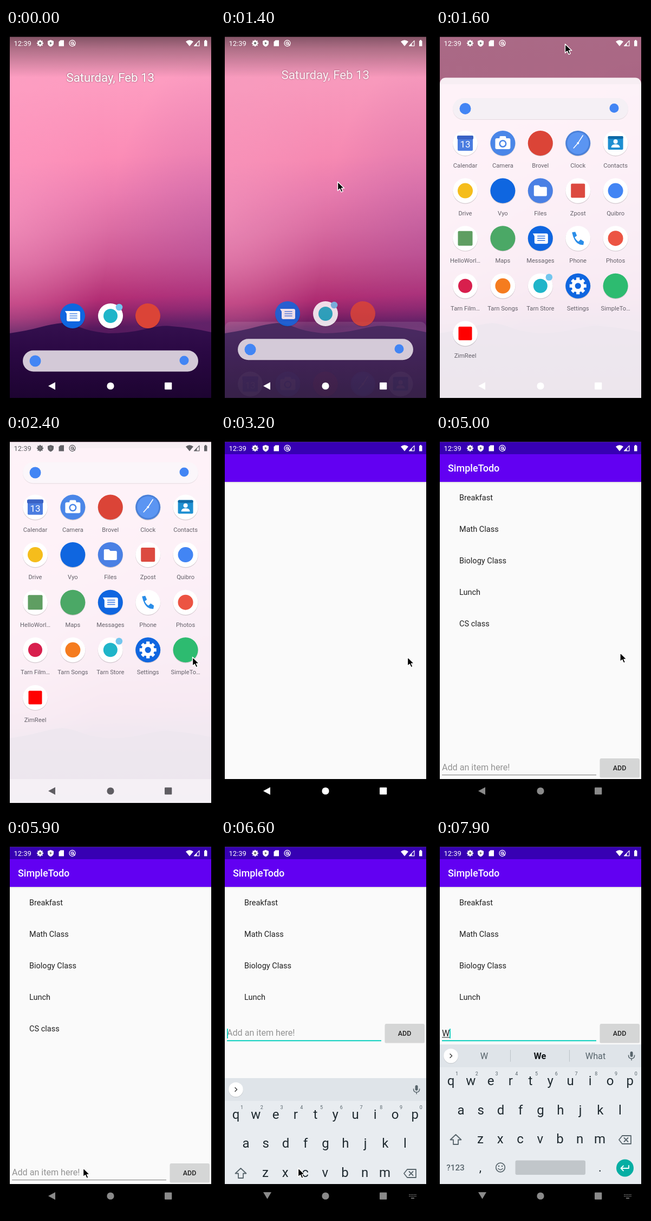
Recreate the animation shown at these times as an HTML page. Size 386x694 px, loop 8000 ms.

```html
<!DOCTYPE html>
<html lang="en">
<head>
<meta charset="utf-8">
<title>Todo app on a phone</title>
<style>
html, body { margin: 0; width: 100%; height: 100%; overflow: hidden; background: #000; }
svg { display: block; width: 100%; height: 100%; font-family: Roboto, sans-serif; }
.mid { text-anchor: middle; }
</style>
</head>
<body>
<svg id="stage" viewBox="0 0 386 694"></svg>
<script>
const LOOP = 8000;
const stage = document.getElementById('stage');

// Markup helpers
const rect = (x, y, w, h, fill, more = '') => `<rect x="${x}" y="${y}" width="${w}" height="${h}" fill="${fill}" ${more}/>`;
const disc = (x, y, r, fill, more = '') => `<circle cx="${x}" cy="${y}" r="${r}" fill="${fill}" ${more}/>`;
const path = (d, fill, more = '') => `<path d="${d}" fill="${fill}" ${more}/>`;
const line = (d, color, w = 1.5, more = '') => path(d, 'none', `stroke="${color}" stroke-width="${w}" stroke-linecap="round" stroke-linejoin="round" ${more}`);
const text = (x, y, size, fill, str, more = '') => `<text x="${x}" y="${y}" font-size="${size}" fill="${fill}" ${more}>${str}</text>`;
const mid = (x, y, size, fill, str, more = '') => text(x, y, size, fill, str, 'class="mid" ' + more);
const group = (id, body) => `<g id="${id}">${body}</g>`;
const move = (x, y, body) => `<g transform="translate(${x} ${y})">${body}</g>`;
const stops = list => list.map(([o, c, a = 1]) => `<stop offset="${o}" stop-color="${c}" stop-opacity="${a}"/>`).join('');
const screenRect = (fill, more) => rect(7, 16, 372, 665, fill, more);

function gear(r, fill, hole) {
  let teeth = '';
  for (let i = 0; i < 8; i++) {
    teeth += rect(-r * .2, -r, r * .4, r * .5, fill, `transform="rotate(${i * 45})"`);
  }
  return teeth + disc(0, 0, r * .76, fill) + disc(0, 0, r * .36, hole);
}

// App icons, each centred on 0,0
const BLUE = '#0f66e0';
const face = fill => disc(0, 1, 23.2, '#000', 'opacity=".16"') + disc(0, 0, 23, fill);
const badge = (color, r = 12) => face('#fff') + disc(0, 0, r, color);
const tile = (color, s = 24) => face('#fff') + rect(-s / 2, -s / 2, s, s, color, 'rx="2"');
const newDot = disc(16, -16, 6.3, '#73c6ee');

const icon = {
  calendar: face('#fff') + rect(-14, -14, 28, 28, '#4b7de0', 'rx="2"') + rect(-15, -14, 30, 7, '#3a62c4', 'rx="2"') + mid(0, 8, 17, '#fff', '13'),
  camera: face('#4a86e8') + rect(-14, -9, 28, 20, '#fff', 'rx="3"') + rect(-6, -13, 12, 6, '#fff', 'rx="2"') + disc(0, 1, 7, '#4a86e8') + disc(0, 1, 4.5, '#fff'),
  clock: face('#4a80d8') + disc(0, 0, 20, '#5b95f2') + line('M0 0L9 -14', '#fff', 1.6) + line('M0 0L-8 9', '#fff', 1.6) + disc(0, 0, 2, '#fff'),
  contacts: face('#fff') + rect(-14, -13, 28, 25, '#1d8fd1', 'rx="2"') + rect(-14, -13, 28, 5, '#0f6aa6', 'rx="2"') + disc(0, -3, 4, '#fff') + path('M-8 8q0-6 8-6t8 6z', '#fff'),
  files: face('#4a80e4') + path('M-12 -8q0-2 2-2h7l3 3h10q2 0 2 2v13q0 2-2 2h-20q-2 0-2-2z', '#fff'),
  messages: face(BLUE) + path('M-14 -9h25q3 0 3 3v13q0 3-3 3h-19q-3 0-3-3v-11z', '#fff') +
    line('M-5 -4h13M-5 0h13M-5 4h13', '#4a86e8', 1.7),
  phone: face('#fff') + path('M-11 -11l6-1 3 7-4 3q3 6 7 8l4-4 6 4-1 6q-16 1-21-23z', '#2a8de8'),
  settings: face(BLUE) + gear(15.5, '#fff', BLUE)
};

const apps = [
  ['Calendar', icon.calendar], ['Camera', icon.camera], ['Brovel', face('#db4437')], ['Clock', icon.clock], ['Contacts', icon.contacts],
  ['Drive', badge('#f5bd1c', 14)], ['Vyo', face(BLUE)], ['Files', icon.files], ['Zpost', tile('#dc4a40', 26)], ['Quibro', badge('#4285f4', 14)],
  ['HelloWorl…', tile('#5f9e62', 27)], ['Maps', face('#4ba866')], ['Messages', icon.messages], ['Phone', icon.phone], ['Photos', badge('#ec5443', 14)],
  ['Tarn Film…', badge('#d81f4d', 13)], ['Tarn Songs', badge('#f57c1f', 14)], ['Tarn Store', badge('#1fb5c9', 13) + newDot], ['Settings', icon.settings], ['SimpleTo…', face('#2dbb70')],
  ['ZimReel', tile('#f00', 25)]
];
const grid = apps.map(([name, art], i) => {
  const x = 54 + i % 5 * 69.4, y = 136.5 + Math.floor(i / 5) * 87.6;
  return move(x, y, art) + mid(x, y + 45, 11.2, '#65616a', name);
}).join('');

const searchBar = rect(31, 54.5, 324, 39, '#000', 'rx="19.5" opacity=".1"') +
  rect(31, 53.5, 324, 39, '#d3c9d7', 'rx="19.5" id="pill"') +
  disc(54, 73, 10.5, '#4285f4') + disc(329, 72, 8.5, '#4285f4');

const statusBar = text(14.5, 33, 13, 'currentColor', '12:39') +
  move(63, 28, gear(6, 'currentColor', '#777')) +
  path('M82.5 22l5.5 2v4q0 4-5.5 6.5q-5.5-2.5-5.5-6.5v-4z', 'currentColor') + path('M81 25.5l4 2.5-4 2.5z', '#777') +
  path('M100.5 22.5h6.5v11h-9.5v-8z', 'currentColor') +
  disc(122.5, 28, 5.5, 'none', 'stroke="currentColor" stroke-width="1.3"') +
  disc(122.5, 28, 2.3, 'none', 'stroke="currentColor" stroke-width="1.3"') + line('M123 28l4 4', 'currentColor', 1.3) +
  path('M332 25q7-5.5 14 0l-7 8.5z', 'currentColor') +
  line('M347.5 32.8h9.5v-9.5z', 'currentColor', 1.2) + path('M347.5 33l5-5v5z', 'currentColor') +
  path('M366 23.5h1.5v-1.5h2.5v1.5h1.5v10h-5.5z', 'currentColor');

const navBar = group('back', path('M78 659l13-7v14z', 'currentColor')) +
  group('down', path('M78 652h15l-7.5 12.5z', 'currentColor')) +
  disc(193, 659, 6.6, 'currentColor') + rect(293, 652.5, 13.3, 13, 'currentColor', 'rx="1"') +
  group('imeIcon', line('M348 656.5h12M348 659.5h12', 'currentColor', 1.6, 'stroke-dasharray=".3 2.6"') + line('M351.5 663h5', 'currentColor', 1.3));

// Keyboard
const INK = '#1f2a30', SOFT = '#58656c';
const row = (chars, x0, y) => [...chars].map((c, i) => mid(x0 + i * 36.75, y, 24, INK, c)).join('');
const digits = [...'1234567890'].map((c, i) => mid(38.5 + i * 36.75, 437, 9, SOFT, c)).join('');
const keyboard = rect(7, 380, 372, 257, '#e8ecf0') + rect(7, 380, 372, 42, '#dfe4e9') +
  disc(27.5, 402, 13.5, '#000', 'opacity=".12"') + disc(27.5, 401, 13.3, '#fff') + line('M26 397.5l3.5 3.5-3.5 3.5', '#444', 1.6) +
  group('hints', mid(89, 407, 16.3, SOFT, 'W') + mid(192, 407, 16.3, '#101518', 'We', 'font-weight="700"') + mid(294.5, 407, 16.3, SOFT, 'What') +
    line('M137.5 390.5v21M246.5 390.5v21', '#bcc3c8', 1)) +
  rect(358.6, 393, 5, 10, SOFT, 'rx="2.5"') + line('M355.5 400q0 6 5.6 6t5.6-6M361.1 406v3', SOFT) +
  row('qwertyuiop', 27.5, 455) + digits + row('asdfghjkl', 46, 508.5) + row('zxcvbnm', 82, 562) +
  path('M36.5 546l10 9.5h-5.5v8.5h-9v-8.5h-5.5z', 'none', `id="shift" stroke="${SOFT}" stroke-width="1.8" stroke-linejoin="round"`) +
  line('M344 548h16v15h-16l-6-7.5zM347.5 552l7 7M354.5 552l-7 7', SOFT, 1.8) +
  mid(36, 612, 15.3, SOFT, '?123', 'font-weight="500"') + mid(82, 614, 22, INK, ',') + mid(303, 614, 22, INK, '.') +
  disc(119, 606.5, 8.3, 'none', `stroke="${SOFT}" stroke-width="1.7"`) + disc(116, 604, 1.3, SOFT) + disc(122, 604, 1.3, SOFT) +
  line('M114.8 608.5q4.2 4.5 8.4 0', SOFT) +
  rect(146.5, 593.5, 129.5, 26.5, '#c1c6ca', 'rx="3"') +
  disc(349, 607.5, 16, '#06aea3') + line('M356 603v5h-14M346 603.5l-4.5 4.5 4.5 4.5', '#fff', 1.8);

// Todo app
const items = ['Breakfast', 'Math Class', 'Biology Class', 'Lunch', 'CS class'];
const todo = screenRect('#000') + rect(7, 39, 372, 598, '#fafafa') +
  group('list', items.map((s, i) => text(43, 124 + i * 58, 14.5, '#212121', s)).join('')) +
  rect(7, 90, 372, 2, '#000', 'opacity=".08"') +
  rect(7, 16, 372, 23, '#3700b3') + rect(7, 39, 372, 51, '#6200f2') +
  group('title', text(22, 71, 18, '#fff', 'SimpleTodo', 'font-weight="500"')) +
  group('entry', rect(7, 597, 372, 40, '#fafafa') +
    text(11, 621, 16.1, '#939393', 'Add an item here!', 'id="hint"') +
    group('typed', text(11, 621.5, 16.1, '#212121', 'W') + rect(11, 623.5, 14, 1, '#212121')) +
    rect(11, 608, 1.8, 18, '#03cdbb', 'id="caret"') +
    rect(11, 629, 285, 1, '#777', 'id="rule"') +
    rect(302.5, 600, 73.5, 34.5, '#000', 'opacity=".14" rx="2"') + rect(303, 599, 72.5, 34, '#d5d6d6', 'rx="2"') +
    mid(339, 620.5, 12.5, '#222', 'ADD', 'font-weight="500"'));

stage.innerHTML = `<defs>
<linearGradient id="sky" x1="0" y1="0" x2=".03" y2="1">${stops([
  [0, '#fba0c2'], [.15, '#fd9cc0'], [.35, '#fb8cb6'], [.45, '#ec7db0'], [.55, '#db6ca3'], [.63, '#cd5894'],
  [.69, '#bf4282'], [.74, '#b22d74'], [.78, '#8d236a'], [.82, '#561a5e']])}</linearGradient>
<radialGradient id="glow" cx="0" cy=".5" r=".5">${stops([[0, '#ffa2c6', .5], [1, '#ffa2c6', 0]])}</radialGradient>
<radialGradient id="dusk" cx="1" cy=".56" r=".5">${stops([[0, '#a04ca0', .3], [1, '#a04ca0', 0]])}</radialGradient>
<linearGradient id="land" x1="0" y1="0" x2="0" y2="1">${stops([[0, '#35104f'], [.4, '#2a0843'], [1, '#1d0431']])}</linearGradient>
<linearGradient id="dim" x1="0" y1="0" x2="0" y2="1">${stops([[0, '#000', .48], [.3, '#000', .3], [1, '#000', 0]])}</linearGradient>
<clipPath id="screen"><rect x="7" y="16.5" width="372" height="664.5"/></clipPath>
<clipPath id="win"><rect id="winBox"/></clipPath>
</defs>
<rect width="386" height="694"/>
<g clip-path="url(#screen)">
${['sky', 'glow', 'dusk'].map(id => screenRect(`url(#${id})`)).join('')}
${path('M7 562Q40 557 62 551T104 543Q122 545 140 552T190 562Q225 562 258 554T306 549Q345 552 379 560V681H7z', 'url(#land)')}
${rect(7, 16, 372, 75, 'url(#dim)', 'id="shade"')}
${screenRect('#0c0014', 'id="scrim"')}
${group('date', mid(192.7, 98.6, 22.2, '#fff', 'Saturday, Feb 13', 'style="text-shadow:0 0 3px rgba(0,0,0,.45)"'))}
${rect(7, 17, 372, 700, '#fefafd', 'id="panel"')}
${group('dock', move(123, 530, icon.messages) + move(193, 530, badge('#1fb5c9', 13) + newDot) + move(262, 530, face('#db4437')))}
${group('drawer', group('apps', grid) + searchBar)}
${rect(7, 637, 372, 44, '#fff', 'opacity=".4" id="navBand"')}
<g clip-path="url(#win)" id="app">${todo}${group('keys', keyboard)}${rect(7, 637, 372, 44, '#000')}</g>
${group('status', statusBar)}${group('nav', navBar)}
</g>
${group('cursor', path('M0 0V16.5L3.9 13L6.6 19L9.6 17.7L7 11.9H12.2z', '#000', 'stroke="#fff" stroke-width="1.4" stroke-linejoin="round"'))}`;

const el = {};
stage.querySelectorAll('[id]').forEach(e => el[e.id] = e);
const set = (id, attrs) => { for (const k in attrs) el[id].setAttribute(k, attrs[k]); };
const show = (id, on) => set(id, { visibility: on ? 'visible' : 'hidden' });
const slide = (id, y) => set(id, { transform: `translate(0 ${y})` });

// Timing helpers
const clamp = v => Math.max(0, Math.min(1, v));
const span = (t, a, b) => clamp((t - a) / (b - a));
const smooth = u => u * u * (3 - 2 * u);
const easeOut = u => 1 - (1 - u) ** 3;
const mix = (a, b, u) => a + (b - a) * u;
function track(t, keys, ease = u => u) {
  let i = 0;
  while (i < keys.length - 2 && t >= keys[i + 1][0]) i++;
  const [a, b] = [keys[i], keys[i + 1]], u = ease(span(t, a[0], b[0]));
  return a.slice(1).map((v, k) => mix(v, b[k + 1], u));
}

const pointer = [[300, 388, 560], [900, 212, 470], [1200, 212, 440], [1400, 215.5, 283], [1600, 238.5, 29.5],
  [1900, 238.5, 29.5], [2400, 344.5, 412.5], [3650, 344.5, 412.5], [3800, 340, 404.5], [5000, 340, 404.5],
  [5400, 146, 606], [5800, 146, 606], [5900, 142.5, 607.5]];
const panelTop = [[1300, 557], [1400, 543], [1500, 310], [1600, 93], [1700, 36], [1800, 17]];

function drawHome(t) {
  const [top] = track(t, panelTop), p = (557 - top) / 540;
  const lift = clamp(p / .026), fade = clamp(1 - 5 * p);
  set('shade', { opacity: clamp(1 - 1.4 * p) });
  set('scrim', { opacity: .34 * clamp(2 * p), height: top - 5 });
  slide('date', -4.5 * lift);
  slide('dock', -4 * lift);
  set('date', { opacity: fade });
  set('dock', { opacity: fade });
  set('panel', { y: top - p, rx: 11 * clamp(20 - 20 * p), opacity: p > 0 ? .92 * clamp(.08 + 1.5 * p) : 0 });
  slide('drawer', top - 17 - 5 * lift * clamp(1 - 1.2 * p));
  set('apps', { opacity: clamp(1.3 * p) });
  set('pill', { fill: `rgb(${mix(211, 251, p)},${mix(201, 246, p)},${mix(215, 250, p)})` });
  show('navBand', t >= 1850);
}

function drawApp(t) {
  const grow = easeOut(span(t, 2780, 3200));
  show('app', t >= 2800);
  set('app', { opacity: span(t, 2740, 2900) });
  set('winBox', { x: mix(309, 7, grow), y: mix(377, 16, grow), width: mix(46, 372, grow), height: mix(46, 665, grow), rx: 23 * (1 - grow) });
  show('title', t >= 3400);
  show('list', t >= 3500);
  show('entry', t >= 3500);

  const focus = t >= 6400, typed = t >= 7500;
  slide('entry', t >= 6500 ? -257 : 0);
  slide('keys', 257 * (1 - easeOut(span(t, 6450, 6850))));
  show('keys', t >= 6450);
  show('hint', t >= 3500 && !typed);
  show('typed', typed);
  show('hints', typed);
  set('shift', { fill: t >= 7200 && t < 7500 ? SOFT : 'none' });
  show('caret', focus && (t < 6800 || t >= 7200));
  set('caret', { x: typed ? 25 : 11 });
  set('rule', { fill: focus ? '#1fd3c3' : '#777', height: focus ? 2.2 : 1 });
}

function drawBars(t) {
  const drawer = t >= 1800 && t < 2900;
  el.status.style.color = drawer ? '#616065' : '#fff';
  const g = Math.round(mix(255, 138, span(t, 4400, 4800)));
  el.nav.style.color = drawer ? '#5f5d62' : `rgb(${g},${g},${g})`;
  const ime = t >= 6400;
  show('back', !ime);
  show('down', ime);
  show('imeIcon', ime);
}

function draw(t) {
  drawHome(t);
  drawApp(t);
  drawBars(t);
  const [x, y] = track(t, pointer, smooth);
  set('cursor', { transform: `translate(${x} ${y})` });
  show('cursor', t >= 300 && t < 6900);
}

const start = performance.now();
function tick() {
  draw((performance.now() - start) % LOOP);
  requestAnimationFrame(tick);
}
tick();
</script>
</body>
</html>
```
